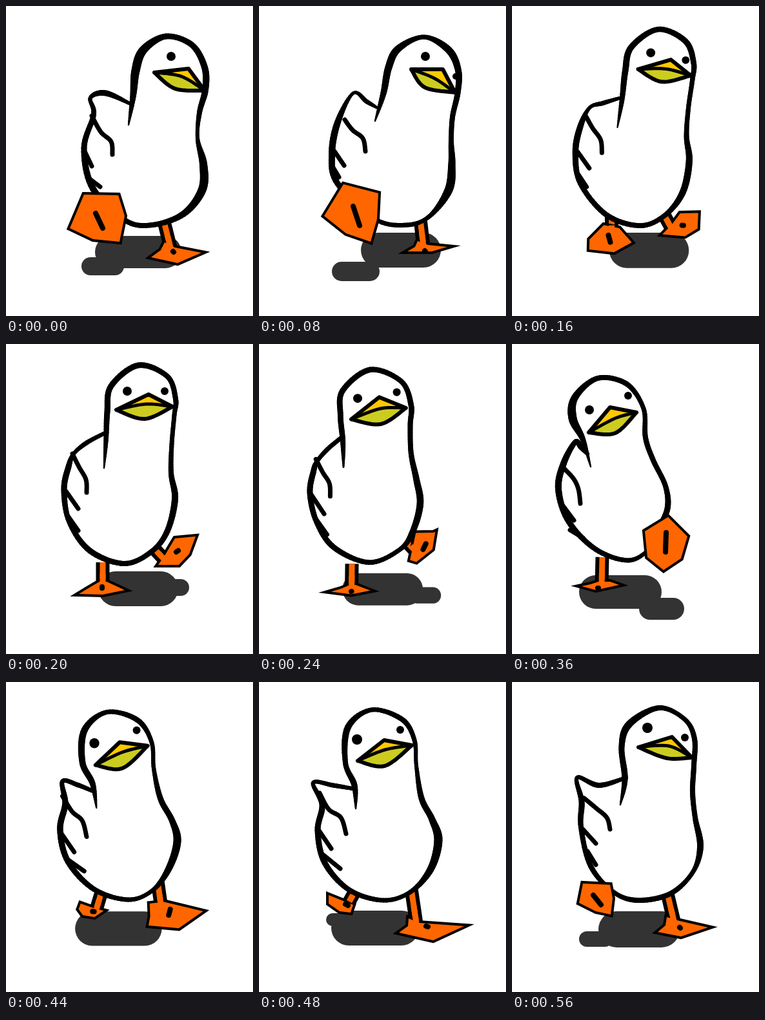
Recreate the animation shown at these times as an HTML page with a canvas. Size 383 by 480 pixels, loop 0.6 s.

```html
<!DOCTYPE html>
<html lang="en">
<head>
<meta charset="utf-8">
<title>Walking duck</title>
<style>
html, body { margin: 0; width: 100%; height: 100%; overflow: hidden; background: #fff; }
canvas { display: block; }
</style>
</head>
<body>
<canvas id="stage" width="383" height="480"></canvas>
<script>
const ctx = document.getElementById('stage').getContext('2d');
const STEPS = 15, STEP_MS = 40;
const INK = '#000', ORANGE = '#ff6600', YELLOW = '#ffc800', OLIVE = '#cccc20', SHADE = '#333';
const keys = [];
const pose = (step, parts) => keys.push({ step, parts });

// body: x, y, line weight, from the neck fold clockwise round to the tail.
// eyes: x, y, radius. beak: left, peak, right, bottom, middle. shade: x, y, rx, ry.
pose(0, {
  body: [190,184,2, 197,140,9, 201,100,13, 213,68,13, 248,47,9, 288,60,9, 308,95,10,
    309,130,10, 300,165,8, 297,205,6, 306,245,12, 304,285,13, 275,322,10, 227,339,8,
    185,332,8, 135,283,10, 121,220,9, 136,168,8, 131,142,6, 155,135,9, 196,153,5],
  wing: [133,170, 147,195, 163,210, 165,230],
  ticks: [122,225, 133,248, 130,268, 146,280],
  eyes: [256,78,7, 306,98,0],
  beak: [230,103, 283,97, 308,131, 262,128, 272,109],
  footL: [121,292, 174,293, 184,325, 176,365, 135,361, 99,344],
  legL: [150,300, 150,310], toeL: [139,321, 150,344],
  footR: [246,366, 262,374, 303,382, 266,398, 225,389, 240,378],
  legR: [246,338, 255,374], toeR: [259,380, 260,381],
  shade: [205,381,67,25, 150,403,33,14]
});
pose(2, {
  body: [180,178,2, 193,135,9, 201,95,11, 216,66,11, 256,48,7, 294,68,11, 309,100,10,
    308,135,9, 300,172,8, 298,210,8, 299,245,11, 294,285,13, 265,325,7, 230,339,7,
    180,330,7, 122,275,9, 113,230,10, 122,180,10, 146,135,5, 167,148,7, 184,158,4],
  wing: [133,176, 145,192, 161,205, 165,225],
  ticks: [117,225, 132,247, 115,250, 124,265],
  eyes: [258,78,7, 305,109,5],
  beak: [236,98, 285,98, 304,134, 257,126, 272,112],
  footL: [131,276, 185,290, 183,330, 173,365, 135,352, 101,325],
  legL: [160,300, 160,310], toeL: [146,310, 156,340],
  footR: [246,364, 262,370, 292,373, 268,380, 230,380, 242,373],
  legR: [250,330, 255,372], toeR: [257,379, 258,380],
  shade: [220,378,62,27, 150,411,37,15]
});
pose(5, {
  body: [152,192,2, 155,150,7, 157,105,9, 163,65,9, 205,33,9, 250,50,8, 263,85,8,
    261,110,7, 257,155,7, 256,200,8, 262,240,10, 250,290,9, 225,322,8, 183,340,8,
    130,320,9, 98,275,8, 90,225,9, 97,190,9, 105,170,6, 125,153,7, 153,138,6],
  wing: [103,170, 113,190, 124,210, 125,230],
  ticks: [93,228, 112,255, 95,265, 112,289],
  eyes: [188,73,7, 246,73,6],
  beak: [171,102, 221,78, 258,97, 215,116, 217,93],
  footL: [145,368, 156,368, 184,381, 150,388, 113,387, 128,378],
  legL: [150,338, 150,372], toeL: [149,376, 149,378],
  footR: [262,301, 294,298, 284,325, 268,342, 236,342, 247,326],
  legR: [228,315, 245,333], toeR: [264,322, 267,320],
  shade: [205,379,62,27, 264,377,20,13]
});
pose(7, {
  body: [113,188,3, 108,150,9, 98,115,9, 100,80,9, 142,49,8, 192,67,8, 211,105,9,
    211,145,9, 218,185,9, 236,220,11, 241,255,11, 230,290,10, 215,315,6, 165,336,7,
    110,312,8, 83,275,9, 70,235,9, 75,200,9, 80,187,7, 92,172,7, 107,155,7],
  wing: [76,188, 88,208, 98,222, 100,242],
  ticks: [72,240, 92,271, 86,280, 101,299],
  eyes: [123,97,7, 185,80,6],
  beak: [120,132, 156,90, 200,105, 165,134, 163,110],
  footL: [132,370, 147,370, 161,377, 137,384, 112,376, 124,374],
  legL: [139,338, 138,376], toeL: [137,383, 137,384],
  footR: [220,290, 243,290, 264,264, 269,300, 250,338, 219,346],
  legR: [235,300, 236,305], toeR: [243,320, 248,303],
  shade: [178,381,63,23, 239,406,31,13]
});
pose(9, {
  body: [122,190,2, 110,148,8, 94,115,13, 98,82,11, 133,53,8, 178,62,8, 204,100,7,
    207,145,8, 219,180,8, 238,220,8, 241,255,9, 225,290,8, 212,318,6, 180,335,7,
    130,318,8, 88,275,9, 72,225,10, 80,185,10, 98,152,8, 107,160,8, 117,170,6],
  wing: [78,190, 95,208, 103,225, 106,247],
  ticks: [75,245, 96,273, 90,288, 110,300],
  eyes: [120,102,7, 180,80,6],
  beak: [119,137, 152,98, 193,106, 160,138, 160,115],
  footL: [134,368, 152,368, 166,373, 130,381, 108,375, 122,372],
  legL: [140,330, 139,374], toeL: [133,378, 134,378],
  footR: [206,290, 242,268, 272,298, 262,332, 235,350, 210,330],
  legR: [235,290, 236,295], toeR: [238,322, 239,292],
  shade: [168,384,64,26, 232,410,35,17]
});
pose(12, {
  body: [150,196,2, 148,160,9, 134,125,8, 138,70,10, 175,43,7, 222,58,8, 241,90,7,
    244,130,6, 252,180,9, 268,212,10, 278,245,13, 266,290,11, 235,325,7, 193,338,7,
    140,322,8, 102,280,9, 91,230,9, 98,190,9, 84,156,6, 115,160,7, 145,165,6],
  wing: [94,172, 108,197, 127,210, 135,235],
  ticks: [93,230, 112,258, 100,268, 126,289],
  eyes: [152,89,8, 219,74,6],
  beak: [153,122, 194,90, 237,98, 195,130, 195,105],
  footL: [108,330, 128,338, 146,345, 142,357, 125,355, 108,343],
  legL: [150,322, 140,340], toeL: [134,344, 138,346],
  footR: [232,366, 248,373, 318,378, 270,400, 217,388, 231,378],
  legR: [236,320, 244,374], toeR: [259,378, 262,379],
  shade: [180,381,68,27, 120,368,16,10]
});
pose(14, {
  body: [168,190,2, 175,150,9, 170,100,9, 182,65,11, 228,40,8, 268,58,7, 283,88,8,
    282,130,8, 280,170,8, 284,210,8, 292,255,10, 280,295,7, 245,328,8, 195,338,8,
    157,325,7, 122,285,8, 107,225,8, 108,185,9, 101,148,6, 135,160,8, 177,148,6],
  wing: [112,180, 130,195, 147,210, 152,228],
  ticks: [110,228, 130,250, 117,262, 130,283],
  eyes: [210,71,8, 268,86,6],
  beak: [196,101, 248,85, 279,117, 240,118, 243,99],
  footL: [110,312, 152,314, 156,335, 153,360, 130,355, 104,342],
  legL: [135,320, 135,325], toeL: [126,330, 138,345],
  footR: [240,364, 260,370, 304,380, 262,394, 226,387, 238,377],
  legR: [241,328, 252,374], toeR: [260,380, 261,381],
  shade: [197,383,63,28, 130,398,26,12]
});

// Key at any index, wrapped around the loop.
function keyAt(i) {
  const n = keys.length, lap = Math.floor(i / n), key = keys[i - lap * n];
  return { step: key.step + lap * STEPS, parts: key.parts };
}

// Cubic blend through the keys.
function poseAt(step) {
  let i = keys.length - 1;
  while (keys[i].step > step) i--;
  const [a, b, c, d] = [-1, 0, 1, 2].map(k => keyAt(i + k));
  const span = c.step - b.step, u = (step - b.step) / span;
  const u2 = u * u, u3 = u2 * u;
  const result = {};
  for (const name in b.parts) {
    result[name] = b.parts[name].map((from, k) => {
      const to = c.parts[name][k];
      const slopeIn = (to - a.parts[name][k]) / (c.step - a.step) * span;
      const slopeOut = (d.parts[name][k] - from) / (d.step - b.step) * span;
      return from * (2 * u3 - 3 * u2 + 1) + to * (3 * u2 - 2 * u3)
        + slopeIn * (u3 - 2 * u2 + u) + slopeOut * (u3 - u2);
    });
  }
  return result;
}

function group(list, size) {
  const out = [];
  for (let i = 0; i < list.length; i += size) out.push(list.slice(i, i + size));
  return out;
}

// Points along a smooth curve; every coordinate, weight included, is blended.
function smooth(pts) {
  const out = [pts[0]], last = pts.length - 1;
  for (let i = 0; i < last; i++) {
    const a = pts[Math.max(i - 1, 0)], b = pts[i], c = pts[i + 1], d = pts[Math.min(i + 2, last)];
    for (let s = 1; s <= 10; s++) {
      const u = s / 10;
      out.push(b.map((v, k) => v + u / 2 * (c[k] - a[k]
        + u * (2 * a[k] - 5 * v + 4 * c[k] - d[k] + u * (3 * (v - c[k]) + d[k] - a[k])))));
    }
  }
  return out;
}

function trace(pts, close) {
  ctx.beginPath();
  pts.forEach(p => ctx.lineTo(p[0], p[1]));
  if (close) ctx.closePath();
}

function fill(pts, color) {
  trace(pts, true);
  ctx.fillStyle = color;
  ctx.fill();
}

function line(pts, width, color = INK, close = false) {
  trace(pts, close);
  ctx.lineWidth = width;
  ctx.strokeStyle = color;
  ctx.stroke();
}

function drawShade(list) {
  ctx.fillStyle = SHADE;
  for (const [x, y, rx, ry] of group(list, 4)) {
    ctx.beginPath();
    ctx.roundRect(x - rx, y - ry, 2 * rx, 2 * ry, Math.min(rx, ry));
    ctx.fill();
  }
}

function drawLeg(leg) {
  const pts = group(leg, 2);
  ctx.lineCap = 'butt';
  line(pts, 21);
  line(pts, 9, ORANGE);
  ctx.lineCap = 'round';
}

function drawFoot(foot, leg, toe) {
  const pts = group(foot, 2), [hip, ankle] = group(leg, 2);
  ctx.lineJoin = 'miter';
  line(pts, 8, INK, true);
  ctx.lineJoin = 'round';
  fill(pts, ORANGE);
  const knee = hip.map((v, k) => (v + ankle[k]) / 2);
  ctx.lineCap = 'butt';
  line([knee, ankle], 9, ORANGE);
  ctx.lineCap = 'round';
  line(group(toe, 2), 8);
}

function drawBody(list) {
  const pts = smooth(group(list, 3));
  fill(pts, '#fff');
  for (let i = 1; i < pts.length; i++) line([pts[i - 1], pts[i]], Math.max(pts[i][2], 1));
}

function drawBeak(list) {
  const [left, peak, right, bottom, middle] = group(list, 2);
  const lower = smooth([left, bottom, right]), lip = smooth([left, middle, right]);
  fill([...lower, ...lip.slice().reverse()], OLIVE);
  fill([peak, ...lip.slice().reverse()], YELLOW);
  line(lip, 5);
  line([...lower, peak], 6, INK, true);
}

function drawEyes(list) {
  ctx.fillStyle = INK;
  for (const [x, y, r] of group(list, 3)) {
    ctx.beginPath();
    ctx.arc(x, y, Math.max(r, 0), 0, 2 * Math.PI);
    ctx.fill();
  }
}

function draw(p) {
  ctx.fillStyle = '#fff';
  ctx.fillRect(0, 0, 383, 480);
  ctx.lineCap = ctx.lineJoin = 'round';
  drawShade(p.shade);
  drawLeg(p.legL);
  drawLeg(p.legR);
  drawBody(p.body);
  line(smooth(group(p.wing, 2)), 7);
  group(p.ticks, 4).forEach(tick => line(group(tick, 2), 7));
  drawEyes(p.eyes);
  drawBeak(p.beak);
  drawFoot(p.footL, p.legL, p.toeL);
  drawFoot(p.footR, p.legR, p.toeR);
}

const start = performance.now();
function tick() {
  const elapsed = Math.max(performance.now() - start, 0);
  draw(poseAt(Math.floor(elapsed / STEP_MS) % STEPS));
  requestAnimationFrame(tick);
}
tick();
</script>
</body>
</html>
```
